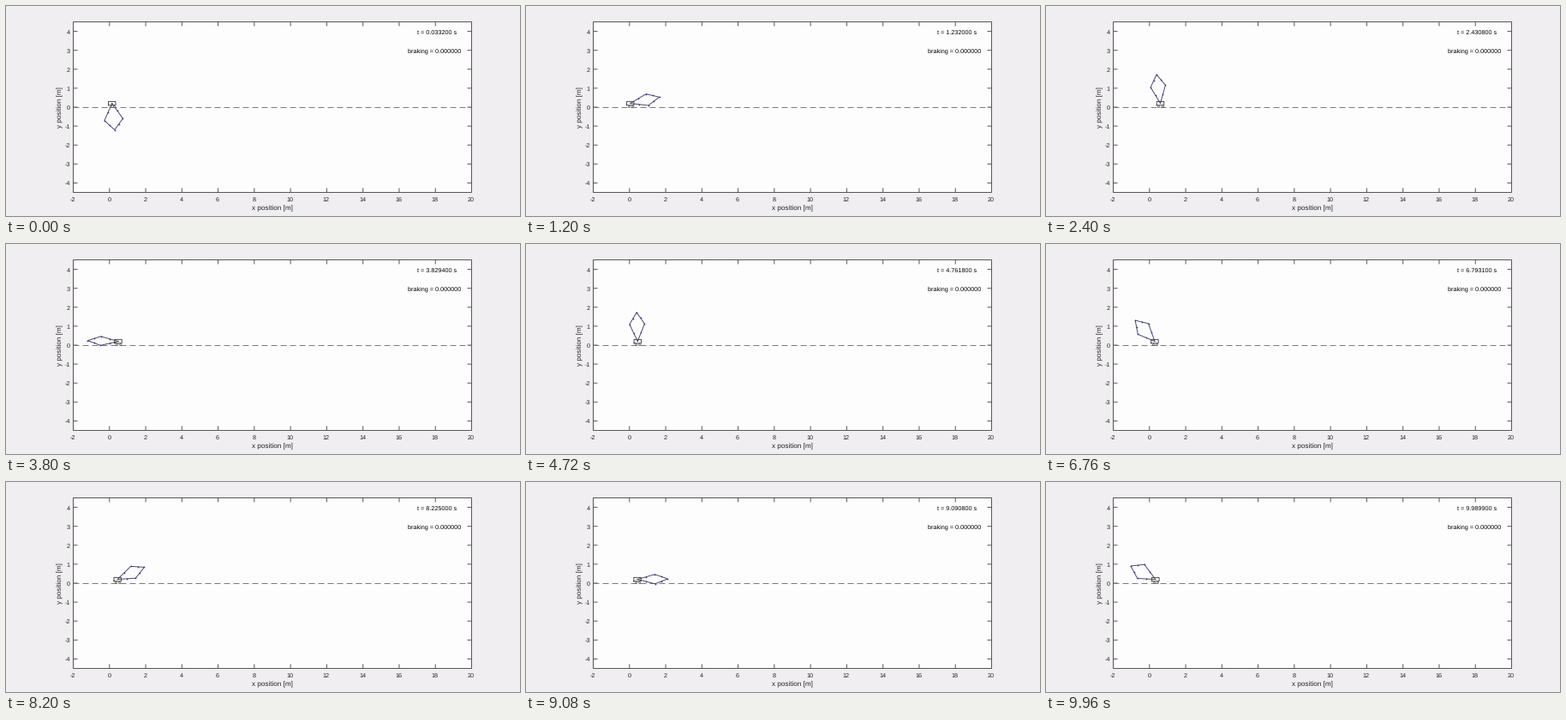
Recreate the animation shown at these times as a matplotlib script. Size 600 by 245 pixels, loop 10000 ms.

```python
import numpy as np
import matplotlib.pyplot as plt
from matplotlib.animation import FuncAnimation
from matplotlib.patches import Rectangle

W, H, DPI = 600, 245, 100
PX = 72 / DPI                      # points per pixel
LEFT, RIGHT, TOP, BOTTOM = 78.5, 543.5, 18.5, 217.5
FRAMES, INTERVAL = 250, 40
STEP = 0.0333                      # simulated seconds per step
UPPER, LOWER, PIVOT_Y = 1.0, 0.75, 0.2
INK, BODY, LINK, DOT = "#585858", "#3c3c3c", "#46466a", "#3030a0"

plt.rcParams["font.family"] = "Liberation Sans"
plt.rcParams["text.hinting"] = "none"

# Where the swing pauses: time, cart position, axis direction in degrees
PAUSES = [(0, .14, -84), (.78, 0, 35), (2.32, .6, -262), (4.72, .45, -628),
          (6.98, .29, -947), (8.6, .457, -680), (9.95, .333, -927.3)]


def ease(u, p=2.5):
    """Slow near both pauses, fast through the bottom."""
    return u**p / (u**p + (1 - u)**p)


def pose(t):
    """Cart position and axis direction at time t."""
    t = np.clip(t, PAUSES[0][0], PAUSES[-1][0])
    for (t0, x0, a0), (t1, x1, a1) in zip(PAUSES, PAUSES[1:]):
        if t <= t1:
            s = ease((t - t0) / (t1 - t0))
            return x0 + (x1 - x0) * s, a0 + (a1 - a0) * s


def spread(t, dt=0.01):
    """Half angle between the upper links; fast swings pull it shut."""
    speed = abs(pose(t + dt)[1] - pose(t - dt)[1]) / (2 * dt)
    return 24.5 - 0.037 * speed + 6.3 * np.exp(-5 * t)


def polar(r, degrees):
    a = np.radians(degrees)
    return np.array([r * np.cos(a), r * np.sin(a)])


def linkage(x, axis, half):
    """Closed outline: pivot, elbow, tip, elbow, pivot."""
    pivot = np.array([x, PIVOT_Y])
    along, across = polar(UPPER, half)
    reach = along + np.sqrt(LOWER**2 - across**2)
    return np.array([pivot,
                     pivot + polar(UPPER, axis + half),
                     pivot + polar(reach, axis),
                     pivot + polar(UPPER, axis - half),
                     pivot])


def to_px(x, y):
    return (LEFT + (np.asarray(x) + 2) * (RIGHT - LEFT) / 22,
            (TOP + BOTTOM) / 2 - np.asarray(y) * (BOTTOM - TOP) / 9)


fig = plt.figure(figsize=(W / DPI, H / DPI), dpi=DPI, facecolor="#f0eef0")
ax = fig.add_axes([0, 0, 1, 1])
ax.set_xlim(0, W)
ax.set_ylim(H, 0)
ax.axis("off")


def line(xs, ys, color=INK, width=1.0, **kw):
    return ax.plot(xs, ys, color=color, lw=width * PX, snap=False, **kw)[0]


def label(x, y, text, size=7.3, color="#262626", va="baseline", **kw):
    return ax.text(x, y, text, fontsize=size * PX, color=color, va=va, **kw)


ax.add_patch(Rectangle((LEFT, TOP), RIGHT - LEFT, BOTTOM - TOP,
                       fc="#fefdfe", ec=INK, lw=PX, snap=False, zorder=0))

TICK = 4.5
for v in range(-2, 21, 2):
    x = to_px(v, 0)[0]
    if -2 < v < 20:
        line([x, x], [BOTTOM, BOTTOM - TICK])
        line([x, x], [TOP, TOP + TICK])
    label(x - 0.5, 228, str(v), ha="center")
for v in range(-4, 5):
    y = to_px(0, v)[1]
    line([LEFT, LEFT + TICK], [y, y])
    line([RIGHT, RIGHT - TICK], [y, y])
    label(74.7, y + 3, str(v), ha="right")

label(310.5, 238.7, "x position [m]", 8.1, ha="center")
label(62.8, 118, "y position [m]", 8.1, ha="center", va="center", rotation=90)

line([LEFT, RIGHT], [118.5, 118.5], "#7c7c7c", dashes=(7, 4))

clock = label(480, 32.7, "", color="black")
label(469, 55, "braking = 0.000000", color="black")

links = line([], [], LINK, 0.95, solid_joinstyle="round")
dots = line([], [], DOT, 0, marker="o", ms=1.7 * PX, mew=0)
cart = line([], [], BODY, 0.9, solid_joinstyle="miter")
wheels = line([], [], BODY, 0, marker="o", ms=1.9 * PX,
              mfc="#fefdfe", mew=0.7 * PX)


def update(n):
    step = round(n * 1.2)
    t = step * STEP
    clock.set_text(f"t = {(step + 1) * STEP - 0.0001:.6f} s")

    x, axis = pose(t)
    points = linkage(x, axis, spread(t))
    mids = (points[:-1] + points[1:]) / 2
    links.set_data(*to_px(*points.T))
    dots.set_data(*to_px(*np.vstack([points[1:4], mids]).T))

    cart.set_data(*to_px(x + np.array([-.2, .2, .2, -.2, -.2]),
                         [.1, .1, .3, .3, .1]))
    wheels.set_data(*to_px([x - .1, x + .1], [.05, .05]))
    return links, dots, cart, wheels, clock


anim = FuncAnimation(fig, update, frames=FRAMES, interval=INTERVAL,
                     repeat=True, repeat_delay=0)
plt.show()
```
